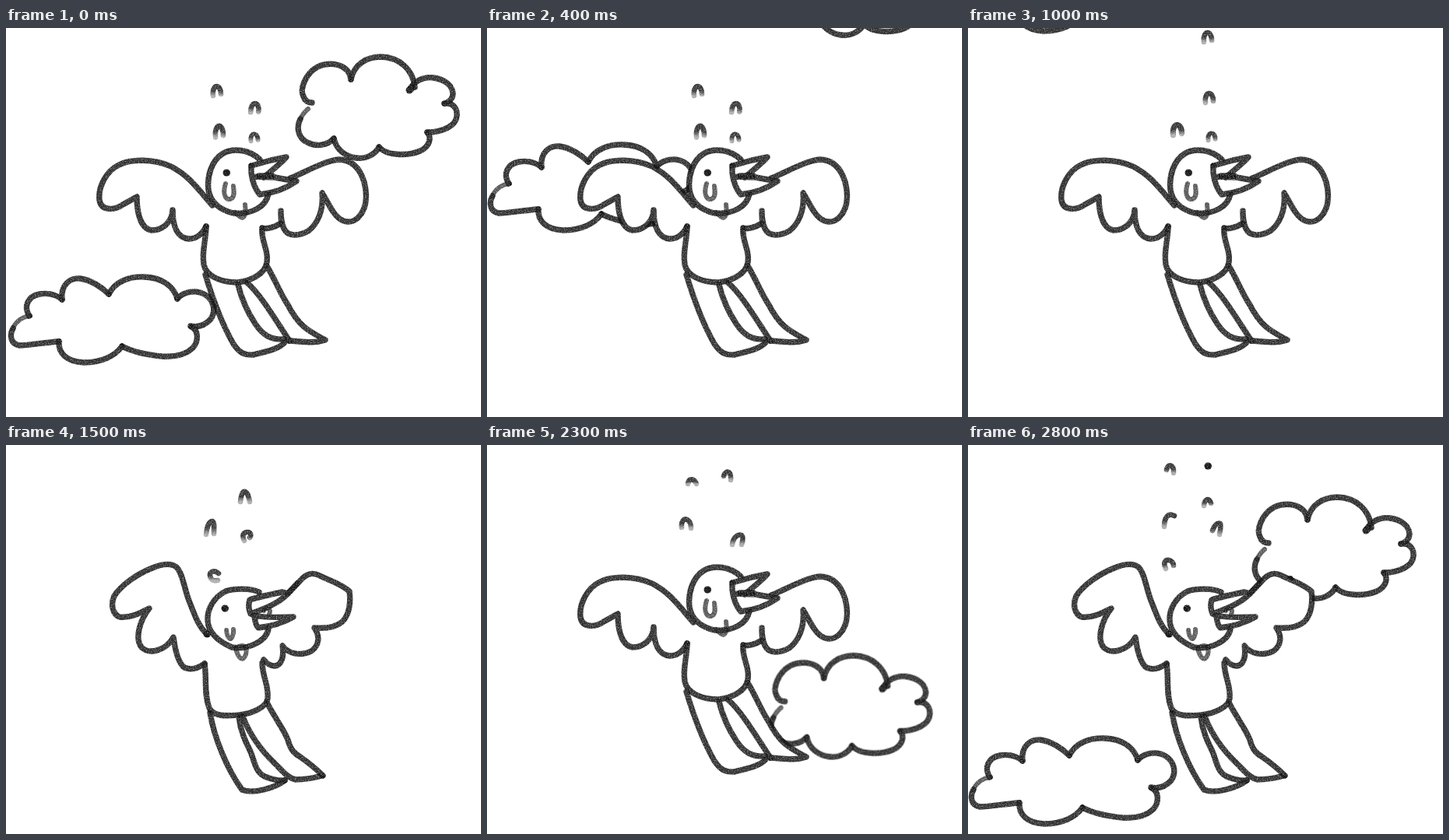
An HTML page for the animation above (2900 ms loop, 610x500 px).

```html
<!DOCTYPE html>
<html lang="en">
<head>
<meta charset="utf-8">
<title>Crying bird in the clouds</title>
<style>
html, body { margin: 0; width: 100%; height: 100%; overflow: hidden; background: #fff; }
svg { display: block; width: 610px; height: 500px; }

.line { fill: none; stroke: #141414; stroke-opacity: .88; stroke-width: 7.4; filter: url(#pencil); }
.line, .line * { stroke-linecap: round; stroke-linejoin: round; }
.paper { fill: #fff; stroke: none; }
.thin { stroke-width: 6; stroke-opacity: .7; }
.dot { stroke-width: 9; stroke-opacity: 1; }
.tears { stroke: url(#fade); stroke-opacity: 1; stroke-width: 6.6; }

.cloud { animation: 2900ms -5ms infinite; }
#right { animation-name: right; }
#left { animation-name: left; }

/* drawings change every 500 ms, the last one is cut short by the loop */
.pose {
  visibility: hidden;
  animation: pose 2900ms calc(var(--k) * 500ms - 2905ms) step-end infinite;
}
.pose.last { animation-name: last; }

@keyframes pose { 0% { visibility: visible } 17.2413%, 100% { visibility: hidden } }
@keyframes last { 0% { visibility: visible } 13.7931%, 100% { visibility: hidden } }

@keyframes right {
  0%       { transform: translate(0, 0); animation-timing-function: steps(4) }
  13.7931% { transform: translate(5px, -158px); animation-timing-function: step-end }
  17.2413% { transform: translate(0, 600px); animation-timing-function: step-end }
  62.0689% { transform: translate(-11px, 433px); animation-timing-function: steps(2) }
  68.9655% { transform: translate(-11px, 353px); animation-timing-function: steps(5) }
  86.2068% { transform: translate(-10px, 154px); animation-timing-function: steps(3) }
  96.5517% { transform: translate(-7px, 30px); animation-timing-function: step-end }
  100%     { transform: translate(0, 0) }
}
@keyframes left {
  0%       { transform: translate(0, 0); animation-timing-function: steps(4) }
  13.7931% { transform: translate(-2px, -170px); animation-timing-function: steps(3) }
  24.1379% { transform: translate(-3px, -324px); animation-timing-function: steps(3) }
  34.4827% { transform: translate(-3px, -426px); animation-timing-function: step-end }
  37.9310% { transform: translate(0, 600px); animation-timing-function: step-end }
  86.2068% { transform: translate(-3px, 157px); animation-timing-function: steps(3) }
  96.5517% { transform: translate(-2px, 57px); animation-timing-function: step-end }
  100%     { transform: translate(0, 0) }
}
</style>
</head>
<body>
<svg viewBox="0 0 610 500">
  <defs>
    <filter id="pencil" filterUnits="userSpaceOnUse" x="0" y="0" width="610" height="500" color-interpolation-filters="sRGB">
      <feTurbulence type="fractalNoise" baseFrequency=".7" numOctaves="2" seed="4"/>
      <feColorMatrix values="0 0 0 0 0  0 0 0 0 0  0 0 0 0 0  1.2 0 0 0 .34" result="grain"/>
      <feGaussianBlur in="SourceGraphic" stdDeviation=".6"/>
      <feComposite operator="in" in2="grain"/>
    </filter>
    <linearGradient id="fade" x1="0" y1="0" x2="0" y2="1">
      <stop offset=".5" stop-color="#141414" stop-opacity=".85"/>
      <stop offset="1.1" stop-color="#141414" stop-opacity=".35"/>
    </linearGradient>
    <path id="tear" d="M-5 7C-7 -8 5 -9 5 5"/>

    <g id="down">
      <path d="M265 228C245 205 235 190 212 178C190 168 160 168 145 176C130 183 118 203 120 221C122 236 140 234 150 227L168 217C168 238 173 258 187 260C201 260 213 250 214 234C214 255 220 270 235 271C245 271 253 264 257 255"/>
      <path d="M365 193C385 185 408 171 427 169C445 169 455 182 460 198C464 214 464 232 452 244C440 254 428 248 420 236C414 227 410 218 406 212C408 235 400 252 388 261C375 268 362 268 357 258C353 250 353 243 353 235"/>
      <path d="M353 251C345 256 337 258 329 258"/>
      <path d="M257 255C257 272 251 288 254 304C257 320 278 327 297 327C315 325 333 316 335 301C338 285 327 275 329 257"/>
      <path d="M256 317C266 350 280 385 292 406C300 418 307 421 318 420C333 416 350 413 358 404"/>
      <path d="M298 330C303 350 310 365 320 380C330 395 340 401 357 400"/>
      <path d="M309 327C325 340 343 370 364 402"/>
      <path d="M335 306C346 324 352 341 362 356C377 385 390 390 410 401C395 406 380 403 364 402"/>
      <path d="M326 169C312 156 292 154 279 161C264 170 258 190 260 208C262 224 275 234 292 238C315 240 334 230 337 213"/>
      <path d="M315 177L340 170L360 166C352 175 340 184 331 192"/>
      <path d="M318 191L345 192L373 197C360 206 345 212 326 214C318 205 314 190 315 177"/>
      <path d="M325 190L342 190"/>
      <path class="dot" d="M283 186h.5"/>
      <path class="thin" d="M282 200C278 212 281 221 288 220C294 218 293 210 292 203"/>
      <path class="thin" d="M307 227C308 236 308 242 303 244C300 243 297 240 294 237"/>
    </g>

    <g id="up">
      <path d="M258 243C246 232 241 215 235 200C229 185 227 165 219 157C211 151 200 153 188 158C168 166 148 180 139 194C134 205 137 218 146 221C160 223 174 215 184 210C172 225 165 248 174 260C184 270 206 264 215 247C217 262 221 280 229 286C238 290 248 286 255 281"/>
      <path d="M362 191L380 172C388 164 395 164 403 168C415 174 430 178 441 188C443 202 441 218 432 227C423 235 410 236 396 235C403 245 403 257 392 265C378 272 362 268 355 258C357 270 355 283 345 284C340 284 335 281 331 276"/>
      <path d="M255 281C258 300 254 320 261 338C266 350 285 348 300 347C315 345 334 338 336 326C338 310 329 297 329 280"/>
      <path d="M262 344C267 375 283 415 303 443C317 449 345 441 358 431"/>
      <path d="M299 349C301 368 308 382 314 394C319 406 320 420 332 426C342 430 350 432 358 431"/>
      <path d="M304 349C313 372 328 393 345 409C355 419 362 428 372 430C385 430 395 428 406 425"/>
      <path d="M335 331C346 352 356 364 362 379C365 390 369 396 378 401C388 408 398 416 407 425"/>
      <path d="M325 189C315 184 292 184 282 188C266 196 258 212 259 226C260 242 272 252 290 260C310 264 335 252 337 236"/>
      <path d="M362 191L355 189C340 192 325 195 313 199C311 205 312 212 314 217C330 211 350 204 362 191L374 178"/>
      <path d="M318 219C335 223 352 221 369 221C355 229 342 233 324 235C320 231 320 226 319 220"/>
      <path class="thin" d="M331 213C336 207 341 211 338 218"/>
      <path class="dot" d="M281 210h.5M258 243h.5"/>
      <path class="thin" d="M283 238C284 248 289 253 291 245C293 240 292 238 292 237"/>
      <path class="thin" d="M295 261C297 270 301 277 305 274C310 270 308 264 309 260C304 257 299 258 295 261"/>
    </g>
  </defs>

  <g id="right" class="cloud"><g class="line">
    <path d="M443 66C440 45 415 43 400 50C384 59 377 79 382 88C384 94 388 96 393 96"/>
    <path d="M443 66C447 46 464 37 482 37C506 38 523 54 525 76"/>
    <path d="M518 80C524 68 536 62 549 64C564 66 573 74 574 84C574 90 570 95 563 97"/>
    <path d="M563 97C574 95 580 104 579 113C578 126 560 134 541 134"/>
    <path d="M541 134C547 142 544 152 532 158C515 165 488 164 479 153"/>
    <path d="M479 153C474 163 461 169 450 167C435 165 424 156 421 142"/>
    <path d="M421 142C413 151 398 153 387 147C374 141 373 126 378 117"/>
    <path class="thin" d="M378 117C381 111 384 107 388 104"/>
    <path class="dot" d="M518 80l4-4"/>
  </g></g>

  <g id="left" class="cloud"><g class="line">
    <path d="M30 370C22 358 28 345 43 342C55 340 65 343 72 349"/>
    <path d="M72 349C70 330 82 321 95 322C110 324 124 334 132 342"/>
    <path d="M132 342C140 326 158 319 178 320C200 321 215 331 220 348"/>
    <path d="M220 348C229 338 245 336 256 343C267 350 270 364 263 374C256 382 247 385 237 383"/>
    <path d="M238 384C247 388 248 402 240 411C230 421 215 423 200 422C180 420 162 416 149 409"/>
    <path d="M149 409C140 422 122 430 100 430C78 429 67 418 68 403"/>
    <path d="M68 403C50 404 30 408 17 408C6 406 4 395 9 386"/>
    <path class="thin" d="M9 386C13 376 22 371 31 370"/>
  </g></g>

  <g class="pose" style="--k:0">
    <use href="#down" class="paper"/>
    <use href="#down" class="line"/>
    <g class="line tears">
      <use href="#tear" transform="translate(271 80)"/>
      <use href="#tear" transform="translate(320 102) rotate(8)"/>
      <use href="#tear" transform="translate(274 132) scale(1 1.15)"/>
      <use href="#tear" transform="translate(319 140) scale(.9 .8)"/>
    </g>
  </g>

  <g class="pose" style="--k:1">
    <use href="#up" class="paper"/>
    <use href="#up" class="line"/>
    <g class="line tears">
      <use href="#tear" transform="translate(269 32)"/>
      <use href="#tear" transform="translate(311 58) scale(1 1.1)"/>
      <use href="#tear" transform="translate(315 114) scale(1.1 1.2)"/>
      <use href="#tear" transform="translate(275 157) scale(1.15 1)"/>
    </g>
  </g>

  <g class="pose" style="--k:2">
    <use href="#down" class="paper"/>
    <use href="#down" class="line"/>
    <g class="line tears">
      <use href="#tear" transform="translate(308 11)"/>
      <use href="#tear" transform="translate(310 89)"/>
      <use href="#tear" transform="translate(269 130) scale(1.1)"/>
      <use href="#tear" transform="translate(313 139) scale(.9 .8)"/>
    </g>
  </g>

  <g class="pose" style="--k:3">
    <use href="#up" class="paper"/>
    <use href="#up" class="line"/>
    <g class="line tears">
      <path d="M301 73C302 64 304 59 307 60C311 62 312 68 313 73"/>
      <path d="M257 115C258 105 261 98 265 98C268 99 267 108 267 114"/>
      <path d="M306 123C302 115 306 112 310 112C315 112 315 117 313 119"/>
      <path d="M273 165C267 160 261 163 262 168C263 174 267 175 272 174"/>
    </g>
  </g>

  <g class="pose" style="--k:4">
    <use href="#down" class="paper"/>
    <use href="#down" class="line"/>
    <g class="line tears">
      <path d="M258 50C259 42 266 43 269 50"/>
      <path d="M304 40C306 32 314 32 313 45"/>
      <path d="M250 106C249 98 253 94 257 96C261 98 262 102 262 107"/>
      <path d="M315 128C316 119 322 114 327 116C330 119 328 124 327 128"/>
    </g>
  </g>

  <g class="pose last" style="--k:5">
    <use href="#up" class="paper"/>
    <use href="#up" class="line"/>
    <g class="line tears">
      <path d="M255 32C256 24 265 24 264 36"/>
      <path class="dot" stroke="#141414" d="M308 27h.5"/>
      <path d="M303 78C304 69 310 67 312 75"/>
      <path d="M252 105C252 93 257 87 265 91"/>
      <path d="M314 110C316 104 320 99 324 101C325 106 324 110 323 115"/>
      <path d="M254 159C250 151 254 147 258 148C262 149 264 152 264 155"/>
    </g>
  </g>
</svg>
</body>
</html>
```
